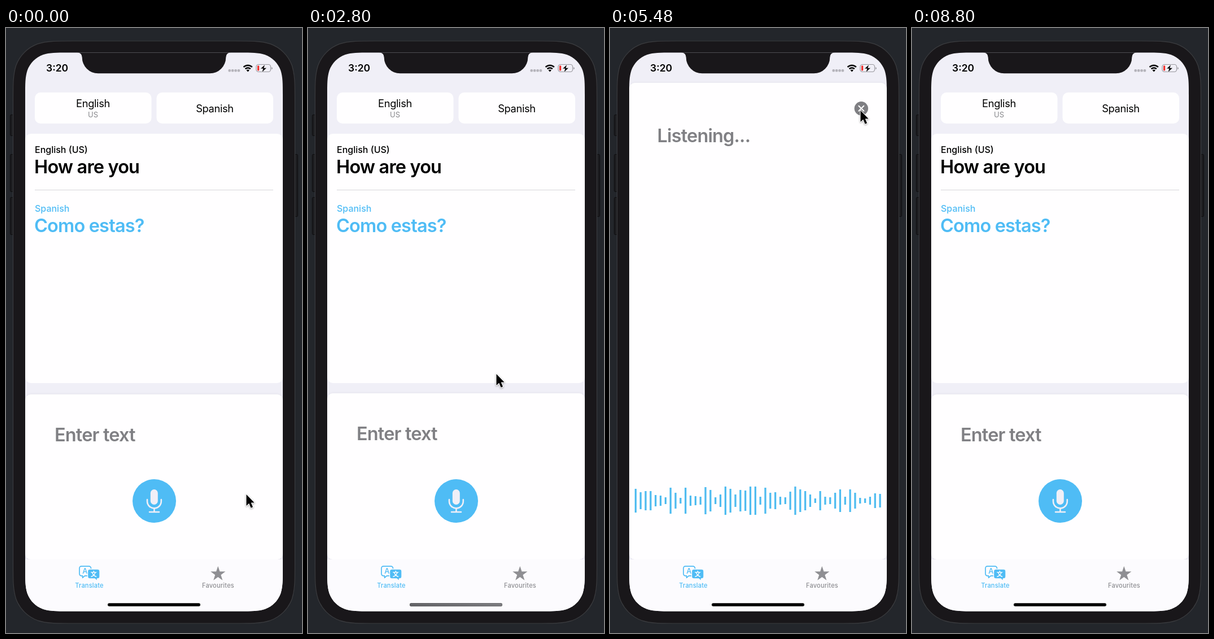
Animation, 524 px wide and 1070 px high, one loop 8840 ms. Source, as an HTML page:

```html
<!DOCTYPE html>
<html lang="en">
<head>
<meta charset="utf-8">
<title>Translate app</title>
<style>
  html, body { margin: 0; width: 100%; height: 100%; overflow: hidden; background: #23262b; }
  svg { display: block; width: 100%; height: 100%; }
  text { font-family: Inter, Roboto, sans-serif; font-optical-sizing: none; }
  .title { font-size: 32.5px; font-weight: 600; letter-spacing: -.026em; }
  .lang { font-size: 18.3px; letter-spacing: -.02em; text-anchor: middle; }
  .label { font-size: 16px; font-weight: 500; }
  .tab { font-size: 11.1px; font-weight: 500; letter-spacing: .015em; text-anchor: middle; }
  .blue { fill: #4fbcf5; }
  .hint { fill: #808084; }
  .key { font-size: 25px; text-anchor: middle; }
  .word { font-size: 17px; text-anchor: middle; }
  .line { fill: none; stroke-linecap: round; stroke-linejoin: round; }
  #cursor { filter: drop-shadow(0 1.5px 1.5px rgba(0, 0, 0, .35)); }
  #sheet { filter: drop-shadow(0 0 2px rgba(0, 0, 0, .06)); }
</style>
</head>
<body>
<svg viewBox="0 0 524 1070">
  <defs>
    <clipPath id="screen"><path id="glass"/></clipPath>
    <linearGradient id="dim"><stop stop-color="#646468"/><stop offset="1" stop-color="#7c7c80"/></linearGradient>
  </defs>

  <g fill="#1c1c1f" stroke="#0d0d0f">
    <rect x="7.5" y="153.5" width="9" height="37" rx="2"/>
    <rect x="7.5" y="223.5" width="9" height="66" rx="2"/>
    <rect x="7.5" y="299.5" width="9" height="66" rx="2"/>
    <rect x="507.5" y="223.5" width="9" height="110" rx="2"/>
  </g>
  <path id="bezel" fill="#19171a" stroke="#3b3c3f" stroke-width="1.2"/>

  <g clip-path="url(#screen)">
    <rect x="34" y="43" width="456" height="989" fill="#f0eff7"/>

    <g fill="#fffeff">
      <rect x="51" y="114" width="206.5" height="55" rx="10"/>
      <rect x="266.5" y="114" width="206.5" height="55" rx="10"/>
      <rect x="34" y="187" width="456" height="441" rx="10"/>
    </g>
    <text class="lang" x="154" y="140">English</text>
    <text x="154" y="158" font-size="13" text-anchor="middle" fill="#88888c">US</text>
    <text class="lang" x="369.5" y="148.5">Spanish</text>
    <text class="label" x="51" y="220.5">English (US)</text>
    <text class="title" x="50" y="256.5">How are you</text>
    <path d="M51 286.5H473" stroke="#d6d5da"/>
    <text class="label blue" x="51" y="325">Spanish</text>
    <text class="title blue" x="50" y="360.5">Como estas?</text>

    <rect id="sheet" x="34" width="456" rx="10" fill="#fffeff"/>
    <g id="mic">
      <circle class="blue" cx="262.5" cy="836.5" r="38.5"/>
      <rect x="255.8" y="816" width="13" height="27" rx="6.5" fill="#f0eff7"/>
      <path class="line" stroke="#f0eff7" stroke-width="2.6" d="M250 834v3a12.4 12.4 0 0 0 24.8 0v-3M262.4 850v6M254 856h17"/>
    </g>
    <path id="wave" stroke="#4fbcf0" stroke-width="3.3"/>
    <text id="enter" class="title hint" x="86" y="0">Enter text</text>
    <text id="listening" class="title hint" x="83.5" y="0">Listening...</text>
    <rect id="caret" x="84.2" y="-32" width="2.5" height="40" fill="#3fc1e6"/>
    <g id="close">
      <circle r="12.2" fill="#7f7f83"/>
      <path class="line" stroke="#fff" stroke-width="2" d="M-4.5-4.5l9 9M4.5-4.5l-9 9"/>
    </g>

    <rect x="34" y="940" width="456" height="92" fill="#fcfbfe"/>
    <path class="line" stroke="#4fbcf5" stroke-width="1.7" d="M133.5 951.8h13a4 4 0 0 1 4 4v9a4 4 0 0 1-4 4h-7l-4 3.5v-3.5h-2a3.5 3.5 0 0 1-3.5-3.5v-10a3.5 3.5 0 0 1 3.5-3.5z"/>
    <text class="blue" x="139.8" y="965" font-size="13" font-weight="500" text-anchor="middle">A</text>
    <path class="blue" stroke="#fcfbfe" stroke-width="1.4" d="M148.5 957h13.500a4 4 0 0 1 4 4v9a4 4 0 0 1-4 4h-.5v4l-4.500-4h-8.500a4 4 0 0 1-4-4v-9a4 4 0 0 1 4-4z"/>
    <text x="155.3" y="969.6" font-size="11" font-weight="700" text-anchor="middle" fill="#fff" style="font-family:'Noto Sans CJK SC','Noto Sans CJK JP',sans-serif">文</text>
    <text class="tab blue" x="147.5" y="990">Translate</text>
    <path fill="#8f8f93" transform="translate(375.3 965.6)" d="M0-13.8L3.2-4.4 13.1-4.3 5.1 1.7 8.1 11.2 0 5.4-8.1 11.2-5.1 1.7-13.1-4.3-3.2-4.4z"/>
    <text class="tab" x="375.5" y="990" fill="#8f8f93">Favourites</text>

    <g id="keyboard">
      <rect x="34" width="456" height="384" fill="#cfd2d9"/>
      <path d="M185.5 14v28M337.5 14v28" stroke="#b3b6bd"/>
      <g id="keys"></g>
      <path d="M63.3 198.5l10 10h-5v7.5h-10v-7.5h-5z" stroke="#000" stroke-linejoin="round"/>
      <g class="line" stroke="#111" stroke-width="1.8">
        <path d="M448.5 207.5l7-7.5q1-1 2.5-1h13q3 0 3 3v11q0 3-3 3h-13q-1.5 0-2.5-1z"/>
        <path d="M460.5 203.5l8 8M468.5 203.5l-8 8"/>
      </g>
      <g class="line" stroke="#53565c" stroke-width="2">
        <circle cx="79" cy="337" r="13.8"/>
        <path d="M71 339h16a8 7.5 0 0 1-16 0zM72.5 342h13"/>
        <rect x="440.5" y="321" width="9.5" height="20" rx="4.75"/>
        <path d="M435.8 333v3a9.5 9.5 0 0 0 19 0v-3M445.3 346v5.5M439.5 351.5h11.5"/>
      </g>
      <g fill="#53565c"><ellipse cx="74.5" cy="332" rx="1.7" ry="2.3"/><ellipse cx="83.5" cy="332" rx="1.7" ry="2.3"/></g>
    </g>

    <rect x="180" y="1017.2" width="164" height="5.6" rx="2.8"/>
    <rect id="homeDim" x="180" y="1017.2" width="164" height="5.6" rx="2.8" fill="url(#dim)"/>

    <text x="71" y="77" font-size="17.5" font-weight="600">3:20</text>
    <g fill="#b5b4bb">
      <rect x="393.5" y="73" width="4.5" height="4.5" rx="1.5"/>
      <rect x="398.9" y="73" width="4.5" height="4.5" rx="1.5"/>
      <rect x="404.3" y="73" width="4.5" height="4.5" rx="1.5"/>
      <rect x="409.7" y="73" width="4.5" height="4.5" rx="1.5"/>
    </g>
    <path d="M420.6 69.2a10.6 10.6 0 0 1 15.2 0M423.6 72.4a6.4 6.4 0 0 1 9.2 0" fill="none" stroke="#000" stroke-width="2.5"/>
    <path d="M428.2 77.6l-2.7-2.8a3.8 3.8 0 0 1 5.4 0z"/>
    <rect x="443" y="64.5" width="25.5" height="13" rx="4" fill="none" stroke="#98979d" stroke-width="1.2"/>
    <rect x="445" y="66.5" width="3.2" height="9" rx="1" fill="#f0322f"/>
    <path d="M470 69v4.5q1.7-.8 1.7-2.25t-1.7-2.25z" fill="#98979d"/>
    <path d="M458.5 64.5l-8 7.5h4.5l-2 6.5 8.5-8h-4.8z" stroke="#f0eff7" stroke-width=".6"/>
    <path fill="#19171a" d="M126 43Q134.5 44 134.7 52A28.3 28.3 0 0 0 163 80.3H361A28.3 28.3 0 0 0 389.3 52Q389.5 44 398 43z"/>
  </g>

  <path id="cursor" d="M.5 1V21L5.2 16.8 8.6 24.8 12 23.3 8.700 15.500H14.600z" stroke="#fff" stroke-width="2.2" stroke-linejoin="round" paint-order="stroke"/>
</svg>

<script>
const LOOP = 8840, TICK = 40;
const SOFT = 11.42, SNAPPY = 18.9; // spring frequencies, rad/s
const el = Object.fromEntries([...document.querySelectorAll('[id]')].map(e => [e.id, e]));

// Half heights of the sound bars
const BARS = [21, 15, 17, 17, 10, 9, 6, 23, 14, 5, 23, 9, 8, 7, 24, 19, 6, 11, 25, 21, 11, 19, 18, 25, 25,
  7, 23, 14, 15, 7, 6, 16, 25, 20, 17, 11, 4, 17, 7, 6, 14, 20, 7, 20, 14, 5, 4, 7, 13, 12];

// Pointer stops: time, x, y
const STOPS = [
  [0, 425, 824], [360, 365, 760], [1440, 365, 760], [1800, 444, 143],
  [2000, 444, 143], [2200, 333, 611], [2920, 333, 611], [3520, 270, 840],
  [4880, 270, 840], [5240, 443, 145], [5500, 443, 145], [5760, 323, 512],
  [6400, 323, 512], [6600, 283, 655], [7120, 283, 655], [7320, 252, 807]
];

// Smooth corner as three relative curves, in units of its radius
const CORNER = [[.44, 0], [.66, 0], [.897, .075], [.259, .094], [.462, .297], [.556, .556],
  [.075, .237], [.075, .457], [.075, .897]];

const clamp = v => Math.min(1, Math.max(0, v));
const ramp = (t, a, b) => clamp((t - a) / (b - a));
const smooth = v => v * v * (3 - 2 * v);
const mix = (a, b, k) => a + (b - a) * k;
const spring = (t, start, freq) => {
  const x = Math.max(0, t - start) / 1000 * freq;
  return 1 - (1 + x) * Math.exp(-x);
};
const place = (node, x, y) => node.setAttribute('transform', `translate(${x.toFixed(2)} ${y.toFixed(2)})`);
const fade = (node, v) => { node.style.opacity = v; };

function smoothBox(x, y, w, h, r) {
  const inset = 1.528 * r;
  const sides = [[1, 0, w], [0, 1, h], [-1, 0, w], [0, -1, h]].map(([c, s, size]) => {
    const len = size - 2 * inset;
    const curve = CORNER.map(([u, v]) => `${((u * c - v * s) * r).toFixed(2)} ${((u * s + v * c) * r).toFixed(2)}`);
    return `l${len * c} ${len * s}c${curve.join(' ')}`;
  });
  return `M${x + inset} ${y}${sides.join('')}z`;
}

function buildKeys() {
  let out = '';
  const text = (cls, x, y, s) => { out += `<text class="${cls}" x="${x}" y="${y}">${s}</text>`; };
  const cap = (x, y, w, fill) => {
    out += `<rect x="${x}" y="${y + 1.4}" width="${w}" height="49.5" rx="6" fill="#8c8f96"/>` +
      `<rect x="${x}" y="${y}" width="${w}" height="49.5" rx="6" fill="${fill}"/>`;
  };
  const WHITE = '#fffeff', GREY = '#a9adb9';
  [['QWERTYUIOP', 57.8, 59], ['ASDFGHJKL', 81, 121], ['ZXCVBNM', 126.5, 182.5]].forEach(([row, x0, y]) =>
    [...row].forEach((ch, i) => {
      const x = x0 + 45.35 * i;
      cap(x - 19.75, y, 39.5, WHITE);
      text('key', x, y + 34, ch);
    }));
  cap(38, 182.5, 50, WHITE);
  cap(436, 182.5, 50, GREY);
  [['123', 38, 108, GREY, 275], ['space', 153, 219.5, WHITE, 273.5], ['return', 379, 107, GREY, 273.5]]
    .forEach(([s, x, w, fill, y]) => { cap(x, 244.5, w, fill); text('word', x + w / 2, y, s); });
  [['I', 110], ['The', 262], ['I’m', 414]].forEach(([s, x]) => text('lang', x, 34.5, s));
  el.keys.innerHTML = out;
}

function wavePath(t) {
  const pos = (t - 5480) / 120, step = Math.floor(pos), k = smooth(pos - step);
  const bar = (i, s) => BARS[(i + 17 * (s + 50)) % 50];
  return BARS.map((_, i) => {
    const h = mix(bar(i, step), bar(i, step + 1), k);
    return `M${(45.4 + 8.83 * i).toFixed(2)} ${(836 - h).toFixed(2)}v${(2 * h).toFixed(2)}`;
  }).join('');
}

function moveCursor(t) {
  const n = STOPS.findIndex(s => s[0] > t);
  const b = STOPS.at(n), a = n < 0 ? b : STOPS[n - 1];
  const k = smooth(ramp(t, a[0], b[0] + (a === b)));
  place(el.cursor, mix(a[1], b[1], k), mix(a[2], b[2], k));
  fade(el.cursor, 1 - ramp(t, 7640, 7880));
}

function render(t) {
  const typing = spring(t, 580, SNAPPY) - spring(t, 2120, SOFT);
  const listen = spring(t, 3850, SOFT) - spring(t, 5570, SOFT);
  const keys = spring(t, 598, SNAPPY) - spring(t, 2200, SNAPPY);
  const open = typing + listen, top = 648 - 551 * open;

  el.sheet.setAttribute('y', top);
  el.sheet.setAttribute('height', 940 - top);

  const base = top + 105 - 22 * (1 - open) ** 3;
  [el.enter, el.listening, el.caret].forEach(node => place(node, 0, base));
  place(el.close, 444.8, top + 45.3);
  fade(el.close, ramp(open, .2, .6));

  const voice = ramp(listen, .1, .7);
  fade(el.enter, 1 - voice);
  fade(el.listening, voice);
  fade(el.mic, 1 - voice);
  fade(el.wave, voice);
  if (voice > 0) el.wave.setAttribute('d', wavePath(t));

  fade(el.caret, ramp(t, 600, 680) - ramp(t, 1120, 1320) + ramp(t, 1440, 1640) - ramp(t, 2040, 2260));
  place(el.keyboard, 0, 1032 - 382 * keys);
  fade(el.homeDim, ramp(t, 2040, 2200) - ramp(t, 3840, 4080));
  moveCursor(t);
}

let start;
function frame(now) {
  start ??= now;
  const t = (now - start) % LOOP;
  render(Math.floor(t / TICK) * TICK);
  requestAnimationFrame(frame);
}

el.bezel.setAttribute('d', smoothBox(12.5, 23, 499, 1030, 69));
el.glass.setAttribute('d', smoothBox(34, 43.5, 456, 988, 50));
buildKeys();
render(0);
requestAnimationFrame(frame);
</script>
</body>
</html>
```
